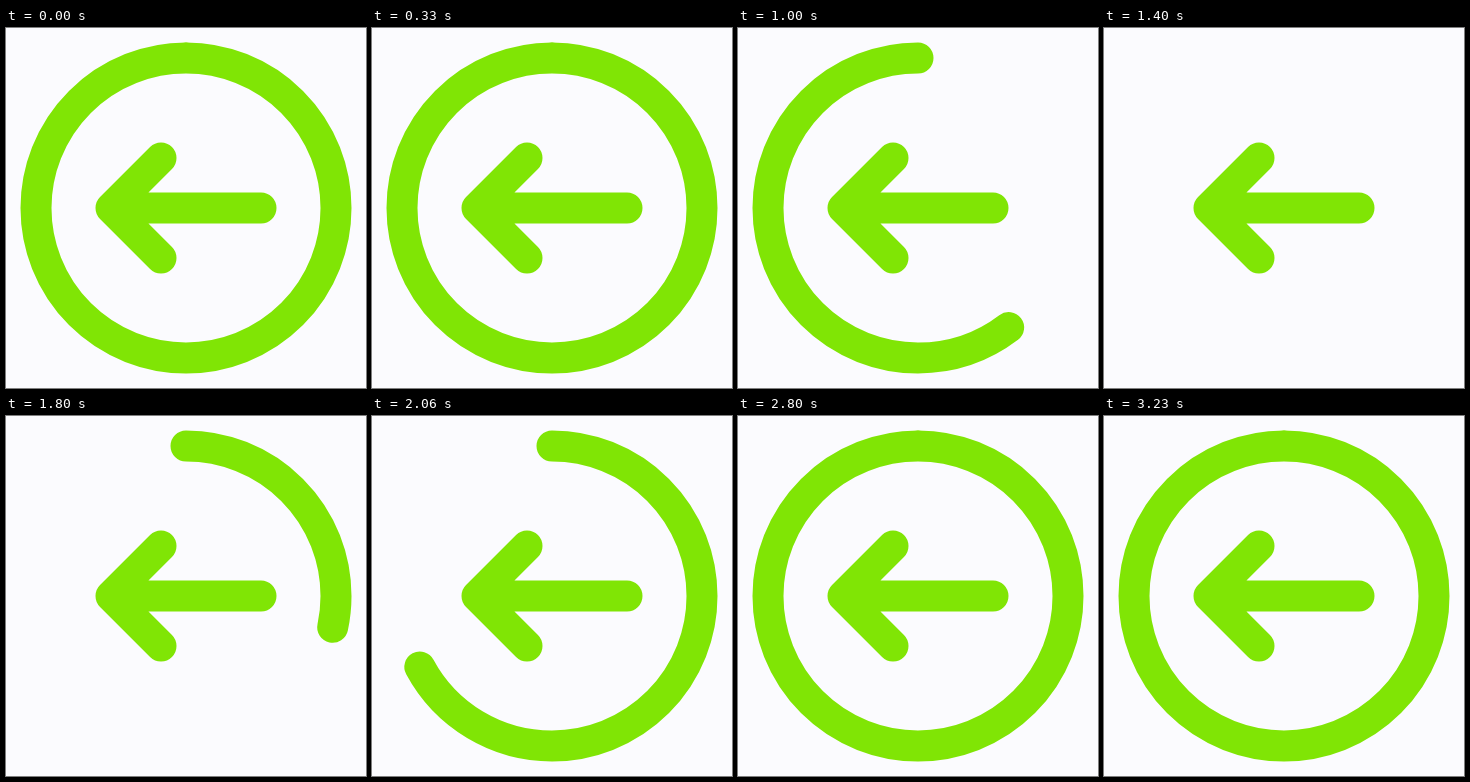
These frames come from a looping animation (360x360 px, 3260 ms). An HTML page:

```html
<!DOCTYPE html>
<html lang="en">
<head>
<meta charset="utf-8">
<title>Back arrow</title>
<style>
  html, body { margin: 0; width: 100%; height: 100%; overflow: hidden; background: #fbfbfe; }
  svg { display: block; width: 100%; height: 100%; }
  path { fill: none; stroke: #80e505; stroke-width: 31; stroke-linecap: round; stroke-linejoin: round; }
  #ring { stroke-dasharray: 360 720; }
</style>
</head>
<body>
<svg viewBox="0 0 360 360">
  <path id="ring" pathLength="360" d="M180 30A150 150 0 0 1 180 330A150 150 0 0 1 180 30"/>
  <path d="M255 180H105M155 130L105 180L155 230"/>
</svg>
<script>
  const LOOP = 3260;
  const EASE = 'cubic-bezier(.4, 0, .9, .9)';

  // time in ms, dash offset in degrees, opacity, easing to the next step
  const steps = [
    [0, 0, 1],
    [529, 0, 1, EASE],
    [1373, -360, 1],
    [1373, 360, 0],
    [1413, 360, 0],
    [1413, 360, 1, EASE],
    [2257, 0, 1],
    [LOOP, 0, 1]
  ];

  const frames = steps.map(([time, turn, opacity, easing = 'linear']) => ({
    offset: time / LOOP,
    strokeDashoffset: turn + 'px',
    opacity,
    easing
  }));

  document.getElementById('ring').animate(frames, { duration: LOOP, iterations: Infinity });
</script>
</body>
</html>
```
